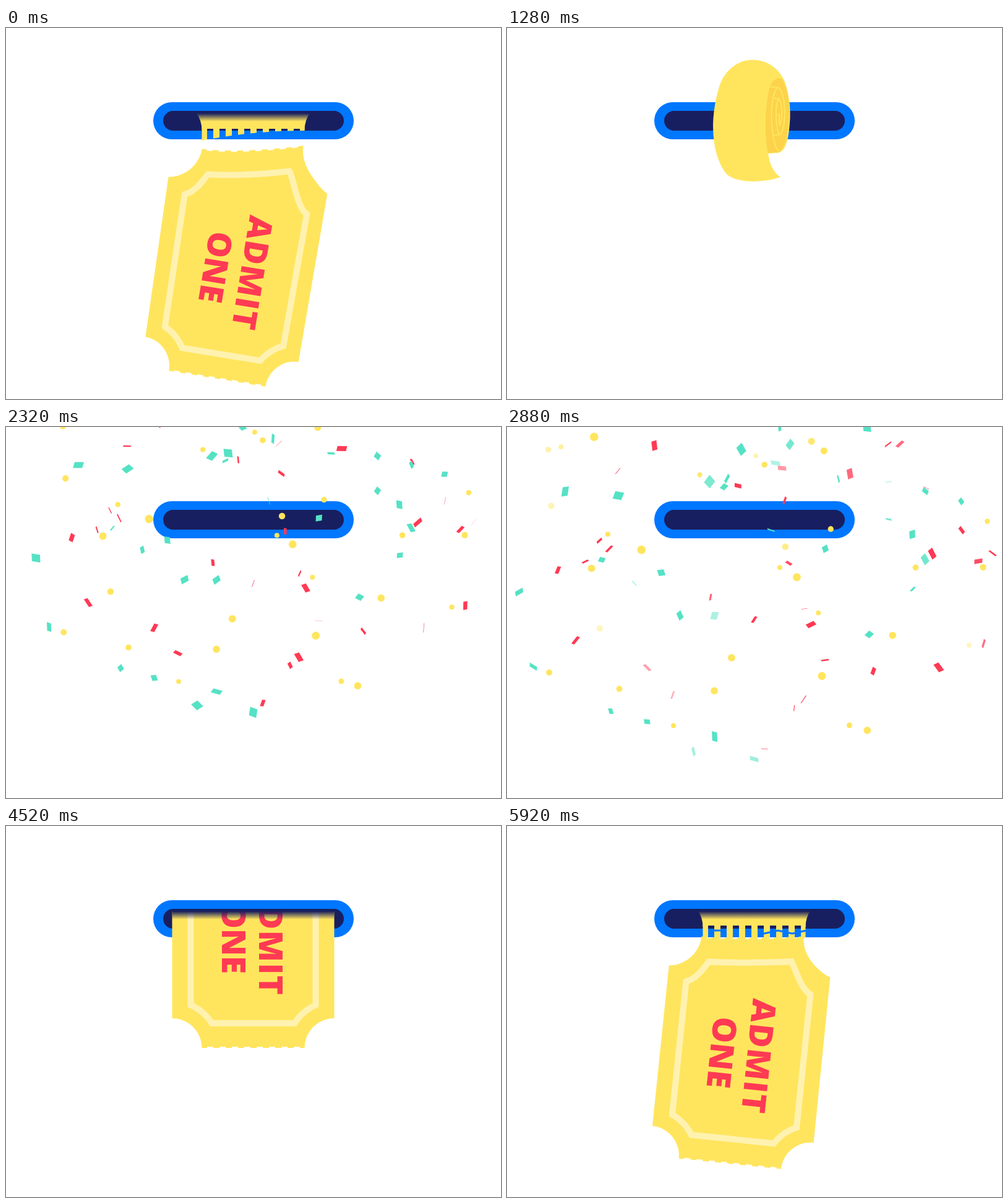
An HTML page with a canvas that plays this animation: 800x600 px, repeating every 5.96 s.

```html
<!DOCTYPE html>
<html lang="en">
<head>
<meta charset="utf-8">
<title>Ticket machine</title>
<style>
  html, body { margin: 0; width: 100%; height: 100%; overflow: hidden; background: #fff; }
  canvas { display: block; width: 800px; height: 600px; }
</style>
</head>
<body>
<canvas id="stage" width="800" height="600"></canvas>
<script>
const ctx = document.getElementById('stage').getContext('2d');
const LOOP = 5960;
const YELLOW = '#ffe55e', CREAM = '#fff2b0', SHADE = '#fcd34a', RED = '#ff3a54';
const BLUE = '#0077ff', NAVY = '#181f60', TEAL = '#55e2c4';
const W = 262, H = 355, NOTCH = 48, LEFT = 268.5;

const clamp = x => Math.max(0, Math.min(1, x));
const mix = (a, b, k) => a + (b - a) * k;
const span = (t, a, b) => clamp((t - a) / (b - a));
const smooth = x => x * x * (3 - 2 * x);

// Monotone cubic interpolation through rows of [time, value, ...].
function slope(keys, i, c) {
  if (!keys[i - 1] || !keys[i + 1]) return 0;
  const rate = j => (keys[j + 1][c] - keys[j][c]) / (keys[j + 1][0] - keys[j][0]);
  const a = rate(i - 1), b = rate(i);
  return a * b > 0 ? 2 * a * b / (a + b) : 0;
}
function track(keys, t) {
  const last = keys.length - 1;
  if (t <= keys[0][0]) return keys[0].slice(1);
  if (t >= keys[last][0]) return keys[last].slice(1);
  const i = keys.findIndex(k => k[0] > t) - 1;
  const d = keys[i + 1][0] - keys[i][0], s = (t - keys[i][0]) / d;
  return keys[i].slice(1).map((v, n) => {
    const c = n + 1, s2 = s * s, s3 = s2 * s;
    return mix(v, keys[i + 1][c], 3 * s2 - 2 * s3)
      + d * slope(keys, i, c) * (s3 - 2 * s2 + s) + d * slope(keys, i + 1, c) * (s3 - s2);
  });
}

// ---- ticket geometry, in its own flat coordinates ----
function halfShape(r, from, to, edge) {
  const arc = [];
  for (let i = 0; i <= 10; i++) {
    const a = mix(from, to, i / 10);
    arc.push([r * Math.cos(a), H - r * Math.sin(a)]);
  }
  return [...arc, ...edge, ...arc.map(([u, v]) => [W - u, v]).reverse()];
}
const closed = half => [...half, ...half.map(([u, v]) => [W - u, H - v])];

const teeth = [], rule = [];
for (let i = 0; i < 8; i++) {
  const a = 56.5 + 20 * i, b = a + 10;
  teeth.push([a, H], [a, H - 2], [b, H - 2], [b, H]);
  rule.push([mix(70, 192, i / 7), H - 40]);
}
const outline = closed(halfShape(NOTCH, Math.PI / 2, 0, teeth));
const border = closed(halfShape(75.5, Math.acos(30 / 75.5), Math.asin(40 / 75.5), rule));

// Pose: centre, degrees, width scale, taper, raise and skewed lift of the upper tab.
function warp([x, y, deg, width, taper, raise, lift]) {
  const a = deg * Math.PI / 180, c = Math.cos(a), s = Math.sin(a);
  return ([u, v]) => {
    const p = (u - W / 2) * width * (1 - taper * v / H), q = v - H / 2;
    const k = Math.max(0, (u - NOTCH) / (W - 2 * NOTCH));
    const inner = mix(.35, 1, clamp(Math.min(u, W - u) / NOTCH));
    const pull = smooth(clamp((70 - v) / 28)) * inner * (raise + lift * Math.pow(k, 1.5));
    return [x + p * c - q * s, y + p * s + q * c - pull];
  };
}
function trace(points) {
  ctx.beginPath();
  points.forEach(([x, y]) => ctx.lineTo(x, y));
  ctx.closePath();
}
function drawTicket(pose) {
  const map = warp(pose);
  trace(outline.map(map));
  ctx.fillStyle = YELLOW;
  ctx.fill();
  trace(border.map(map));
  ctx.strokeStyle = CREAM;
  ctx.lineWidth = 10;
  ctx.stroke();

  const [x, y, deg, width] = pose;
  ctx.save();
  ctx.translate(x, y);
  ctx.rotate(deg * Math.PI / 180);
  ctx.scale(width, 1);
  ctx.rotate(Math.PI / 2);
  ctx.fillStyle = RED;
  ctx.font = '800 53px "Open Sans", sans-serif';
  ctx.textAlign = 'center';
  ctx.fillText('ONE', 0, 50.5);
  ctx.letterSpacing = '1.6px';
  ctx.fillText('ADMIT', 0, -9.5);
  ctx.restore();
}

// ---- ticket motion ----
const feed = [[2940, 122], [4160, 351], [4760, 365], [5640, 518]];
const flatPose = bottom => [LEFT + W / 2, bottom - H / 2, 0, 1, 0, 0, 0];
const torn = [370, 392, 9.3, 1, .05, 8, 32];
const tear = [
  [5640, ...flatPose(518)],
  [5920, 378.8, 369.5, 5.9, 1, 0, 6, 17],
  [LOOP, ...torn]
];
const flight = [
  [0, ...torn],
  [400, 302, 222, 80, .92, 0, 0, 0],
  [600, 368, 150, 90, .75, 0, 0, 0],
  [1200, 518, 150, 90, .72, 0, 0, 0]
];

// ---- parts ----
function capsule(x, y, w, h, color) {
  ctx.fillStyle = color;
  ctx.beginPath();
  ctx.roundRect(x, y, w, h, h / 2);
  ctx.fill();
}
function drawSlot(t) {
  const wide = 14 * Math.sin(Math.PI * span(t, 4560, 4760));
  capsule(238, 120, 324, 60, BLUE);
  capsule(254 - wide, 134, 292 + 2 * wide, 32, NAVY);
}
function inMouth(draw) {
  ctx.save();
  ctx.beginPath();
  ctx.rect(0, 138, 800, 462);
  ctx.clip();
  draw();
  const g = ctx.createLinearGradient(0, 138, 0, 151);
  g.addColorStop(0, NAVY);
  g.addColorStop(1, 'rgba(24,31,96,0)');
  ctx.fillStyle = g;
  ctx.fillRect(LEFT, 138, W, 13);
  ctx.restore();
}
// Perforation strips; depth(u) is how far each reaches below the edge.
function drawStrips(y, depth) {
  ctx.fillStyle = YELLOW;
  for (let i = 0; i < 9; i++) {
    const a = i ? 46.5 + 20 * i : NOTCH, b = i < 8 ? 56.5 + 20 * i : W - NOTCH;
    trace([[LEFT + a, y - 3], [LEFT + b, y - 3], [LEFT + b, y + depth(b)], [LEFT + a, y + depth(a)]]);
    ctx.fill();
  }
}
function drawCrack() {
  ctx.strokeStyle = BLUE;
  ctx.lineWidth = 3;
  ctx.beginPath();
  ctx.moveTo(325, 169);
  ctx.lineTo(353, 169);
  for (let i = 0; i < 4; i++) {
    const x = 415 + 23 * i, y = i % 2 ? 169 : 174;
    if (i) ctx.lineTo(x, y); else ctx.moveTo(x, y);
  }
  ctx.stroke();
}

const rollBody = new Path2D('M343 95C352 67 374 51.5 397 51.5C420 51.5 440 65 449 87C456 108 458 125 457.5 145C456 175 452 201 437 202L422 203C425 222 431 234 442 241C428 246 412 248 397 248C378 248 360 243 353 234C336 210 333 180 333 155C334 130 338 112 343 95Z');
const rollEnd = new Path2D('M422 202C416 180 416 130 424 98C428 84 437 78 445 83C453 97 456 115 456 140C454 170 450 199 437 201Z');
const rollLines = new Path2D('M423 95L437 96C445 98 449 118 449 140C448 160 445 172 439 173L430 173M437 96C430 104 427 125 427.5 145C428 170 432 192 439 199M432 114L439 114C446 122 446 150 440 158M439 114C433 125 434 152 439 172M435 140L440 140L440 157');
function drawRoll(x, y, sx, sy) {
  ctx.save();
  ctx.translate(x, y);
  ctx.scale(sx, sy);
  ctx.translate(-395, -150);
  ctx.fillStyle = YELLOW;
  ctx.fill(rollBody);
  ctx.fillStyle = SHADE;
  ctx.fill(rollEnd);
  ctx.strokeStyle = YELLOW;
  ctx.lineWidth = 2;
  ctx.stroke(rollLines);
  ctx.restore();
}
// The roll grows while winding up the ticket, then is squashed into the slot.
function rollPose(t) {
  const wind = span(t, 620, 1240), gulp = span(t, 1300, 1640);
  return [
    mix(540, 395, smooth(wind)) + 8 * gulp,
    150 + 28 * Math.sin(Math.PI * gulp),
    mix(.05, 1, Math.sqrt(wind)) + .55 * Math.sin(2.2 * gulp),
    1 - gulp * gulp
  ];
}

// ---- confetti ----
let seed = 11;
const rnd = () => (seed = seed * 16807 % 2147483647) / 2147483647;
const BURST = 1840, SPREAD = 2320;
const bits = Array.from({ length: 105 }, (_, i) => {
  const a = rnd() * 2 * Math.PI, r = Math.pow(rnd(), .6);
  return {
    color: [YELLOW, TEAL, RED][i % 3],
    x: 400 + 390 * r * Math.cos(a),
    y: 175 + 290 * r * Math.sin(a),
    size: mix(.65, 1.15, rnd()),
    turn: rnd() * 6.3, flip: rnd() * 6.3,
    spin: mix(-4, 4, rnd()), tumble: mix(4, 9, rnd()),
    life: mix(1150, 1680, rnd())
  };
});
const spread = age => 1 - Math.exp(-age / 190);
function drawConfetti(t) {
  const age = t - BURST, ref = SPREAD - BURST;
  if (age <= 0) return;
  const reach = spread(age) / spread(ref), fall = 6e-5 * (age * age - ref * ref * reach);
  for (const b of bits) {
    const y = mix(150, b.y, reach) + fall;
    const alpha = clamp((b.life - age) / 300) * clamp((572 - y) / 40);
    if (!alpha) continue;
    ctx.save();
    ctx.globalAlpha = alpha;
    ctx.translate(mix(400, b.x, reach), y);
    ctx.fillStyle = b.color;
    if (b.color === YELLOW) {
      ctx.beginPath();
      ctx.arc(0, 0, 6 * b.size, 0, 7);
      ctx.fill();
    } else {
      const s = (t - SPREAD) / 1000, w = 14 * b.size, h = (b.color === RED ? 8 : 13) * b.size;
      ctx.rotate(b.turn + b.spin * s);
      ctx.scale(1, Math.cos(b.flip + b.tumble * s));
      ctx.transform(1, 0, .2, 1, 0, 0);
      ctx.fillRect(-w / 2, -h / 2, w, h);
    }
    ctx.restore();
  }
}

function render(t) {
  ctx.fillStyle = '#fff';
  ctx.fillRect(0, 0, 800, 600);
  drawSlot(t);

  if (t < 320) {
    const bottom = 165 - 50 * Math.pow(span(t, 40, 320), 2);
    inMouth(() => {
      drawTicket(flatPose(bottom));
      drawStrips(bottom, u => 1 + 16 * Math.pow(1 - (u - NOTCH) / (W - 2 * NOTCH), 2));
    });
  }
  if (t < 1220) {
    ctx.save();
    if (t > 620) {
      ctx.beginPath();
      ctx.rect(0, 0, rollPose(t)[0], 600);
      ctx.clip();
    }
    drawTicket(track(flight, t));
    ctx.restore();
  }
  if (t > 620 && t < 1640) drawRoll(...rollPose(t));

  if (t >= 2940) {
    const bottom = track(feed, t)[0], top = bottom - H;
    const tearing = t > 5640, pose = tearing ? track(tear, t) : flatPose(bottom);
    inMouth(() => {
      drawTicket(flatPose(top));
      drawTicket(pose);
      if (tearing) {
        const map = warp(pose);
        drawStrips(top, u => map([u, 0])[1] - top + 2);
        if (t > 5840) drawCrack();
      }
    });
  }
  drawConfetti(t);
}

const origin = performance.now();
function tick() {
  render((performance.now() - origin) % LOOP);
  requestAnimationFrame(tick);
}
tick();
</script>
</body>
</html>
```
